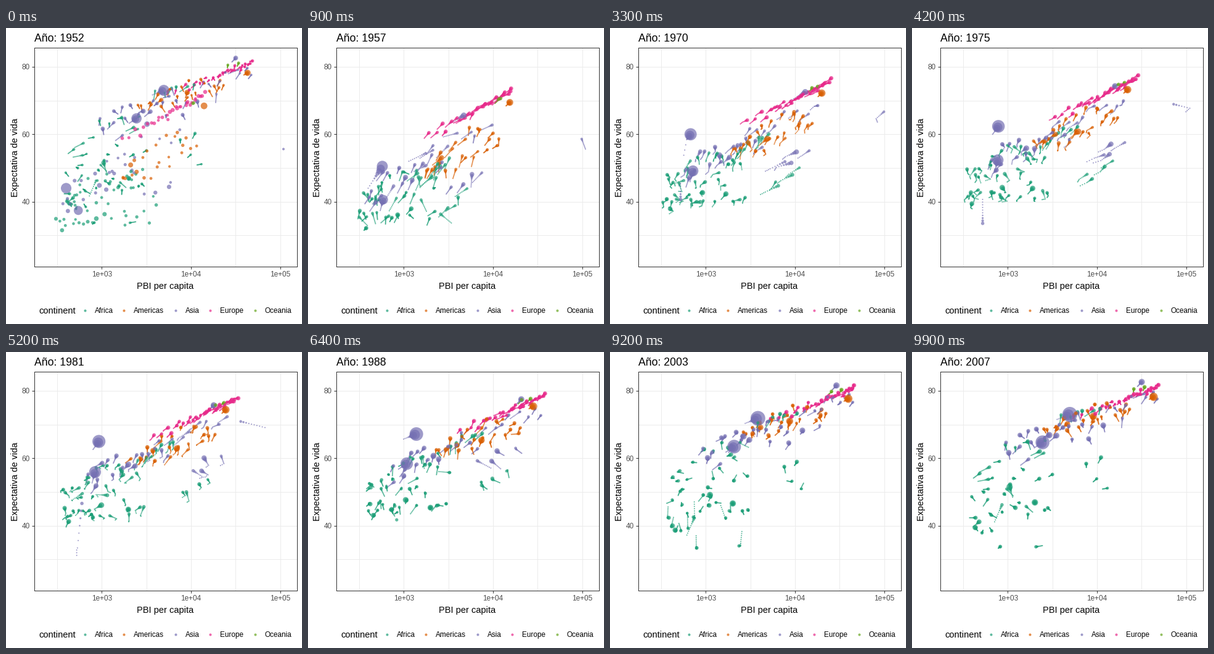
These frames come from a looping animation (480 by 480 pixels, 10000 ms). A matplotlib script:

```python
import numpy as np
import matplotlib.pyplot as plt
from matplotlib.animation import FuncAnimation
from matplotlib.colors import to_rgba

plt.rcParams["font.family"] = "Liberation Sans"

SIZE, DPI, FRAMES, WAKE = 480, 96, 100, 10
ALPHA = 0.7
LEFT, TOP, RIGHT, BOTTOM = 46.2, 32.2, 472.2, 387.2
COLORS = {"Africa": "#1B9E77", "Americas": "#D95F02", "Asia": "#7570B3",
          "Europe": "#E7298A", "Oceania": "#66A61E"}
YEARS = np.linspace(1952, 2007, FRAMES)
STEPS = np.arange(1952, 2008, 5)
T = (STEPS - 1952) / 55

rng = np.random.default_rng(12)
tracks = []  # (rgba, log10 income, life expectancy, point size)


def add(continent, pop, years, logx, life):
    """Store one country; pop holds first and last population in millions."""
    people = np.interp(YEARS, [1952, 2007], pop)
    tracks.append((to_rgba(COLORS[continent], ALPHA),
                   np.interp(YEARS, years, logx),
                   np.interp(YEARS, years, life),
                   1 + 7.2 * np.sqrt(people / 1318)))


def country(continent, pop, *points):
    """A country given by a few (year, income, life expectancy) points."""
    year, income, life = np.array(points, float).T
    add(continent, pop, year, np.log10(income), life)


def blend(first, last, rank, ease):
    """Place at a rank inside a range that moves from first to last."""
    a, b = (lo + (hi - lo) * rank for lo, hi in (first, last))
    return a + (b - a) * ease


def crowd(continent, n, x0, x1, y0, y1, link=0.6, skew=1.0, wobble=1.0,
          boom=0.0, fall=0.0, pop=6, growth=2.8):
    """Countries drifting from box (x0, y0) to (x1, y1), richer ones higher.

    boom lifts income around 1977, fall cuts life expectancy after 1988.
    """
    for q in (np.arange(n) + 0.5) / n:
        r = link * q + (1 - link) * rng.random()
        x = blend(x0, x1, q ** skew, T * (1.6 - 0.6 * T))
        y = blend(y0, y1, r ** skew, T * (1.3 - 0.3 * T))
        x += boom * rng.uniform(0.5, 1) * np.exp(-((STEPS - 1977) / 9) ** 2)
        y -= fall * rng.random() ** 2 * np.clip((STEPS - 1988) / 15, 0, 1)
        x += 0.025 * wobble * rng.normal(size=len(STEPS))
        y += 0.4 * wobble * rng.normal(size=len(STEPS))
        start = min(pop * np.exp(0.9 * rng.normal()), 60)
        add(continent, (start, start * growth), STEPS, x, y)


# China, India, Japan
country("Asia", (556, 1318), (1952, 400, 44), (1957, 576, 50.5),
        (1962, 488, 44.5), (1967, 613, 58.4), (1982, 962, 65.5),
        (2007, 4959, 73))
country("Asia", (372, 1110), (1952, 547, 37.4), (1982, 856, 56.6),
        (2007, 2452, 64.7))
country("Asia", (86, 127), (1952, 3217, 63), (1972, 14779, 73.4),
        (2007, 31656, 82.6))
# Kuwait, Cambodia
country("Asia", (0.2, 2.5), (1952, 108382, 55.6), (1967, 80895, 64.6),
        (1972, 109348, 67.7), (1982, 31354, 71.3), (2007, 47307, 77.6))
country("Asia", (5, 14), (1952, 368, 39.4), (1967, 523, 45.4),
        (1977, 525, 31.2), (1982, 624, 51), (2007, 1714, 59.7))
# Nigeria, Rwanda
country("Africa", (33, 135), (1952, 1077, 36.3), (1977, 1982, 44.5),
        (2007, 2014, 46.9))
country("Africa", (2.5, 8.9), (1952, 493, 40), (1987, 848, 44),
        (1992, 737, 23.6), (1997, 590, 36.1), (2007, 863, 46.2))
# United States, Brazil
country("Americas", (158, 301), (1952, 13990, 68.4), (1982, 25010, 74.6),
        (2007, 42952, 78.2))
country("Americas", (57, 190), (1952, 2109, 50.9), (1977, 6660, 61.5),
        (2007, 9066, 72.4))

# Africa: south of the Sahara, north coast, resource exporters
crowd("Africa", 40, (2.5, 3.4), (2.63, 3.5), (31, 49), (47, 68),
      link=0.25, skew=1.3, wobble=1.6, fall=18, pop=4)
crowd("Africa", 6, (3.15, 3.45), (3.58, 4.04), (42, 52), (71, 76.4))
crowd("Africa", 4, (3.35, 3.7), (3.85, 4.15), (33, 45), (58, 64),
      boom=0.3, fall=14, pop=2)
crowd("Americas", 23, (3.2, 4.05), (3.4, 4.4), (40, 67), (65, 80), pop=4)
# Asia: poorer half, fast growers, oil states
crowd("Asia", 17, (2.55, 3.4), (2.95, 3.95), (36, 56), (61, 75), pop=9)
crowd("Asia", 7, (3.0, 3.95), (4.1, 4.67), (50, 65), (74, 82), pop=3)
crowd("Asia", 4, (3.45, 3.85), (3.65, 4.35), (40, 47), (62, 74),
      boom=0.5, pop=6)
crowd("Europe", 30, (3.1, 4.15), (3.65, 4.7), (54, 73), (69.5, 82),
      link=0.85, skew=0.55, wobble=0.5, pop=9, growth=1.3)
crowd("Oceania", 2, (4.0, 4.03), (4.35, 4.6), (69, 69.5), (80, 81.5),
      wobble=0.3, growth=2)

tracks = [tracks[i] for i in rng.permutation(len(tracks))]
rgba, logx, life, size = (np.array(part) for part in zip(*tracks))

fig = plt.figure(figsize=(SIZE / DPI, SIZE / DPI), dpi=DPI, facecolor="white")
ax = fig.add_axes([LEFT / SIZE, 1 - BOTTOM / SIZE,
                   (RIGHT - LEFT) / SIZE, (BOTTOM - TOP) / SIZE])
ax.set(xlim=(2.2476, 5.1886), ylim=(20.705, 85.605))
ax.set_xticks([3, 4, 5], ["1e+03", "1e+04", "1e+05"])
ax.set_yticks([40, 60, 80])
ax.set_xticks([2.5, 3.5, 4.5], minor=True)
ax.set_yticks([30, 50, 70], minor=True)
ax.set_axisbelow(True)
ax.grid(which="both", color="#EBEBEB", lw=0.75)
ax.tick_params(length=2.75, width=0.75, pad=2.6, color="#333333",
               labelcolor="#4D4D4D", labelsize=8.8)
ax.tick_params(which="minor", length=0)
for spine in ax.spines.values():
    spine.set(color="#333333", lw=0.75)


def label(x, y, text, pt, **kw):
    return fig.text(x / SIZE, 1 - y / SIZE, text, fontsize=pt, **kw)


def area(s):
    """Marker area in square points for a point size in mm."""
    return (0.75 * np.maximum(2.845 * s + 0.945, 2)) ** 2


title = label(46, 22, "", 13.2)
label(258.5, 423, "PBI per capita", 11, ha="center")
label(14.7, 210, "Expectativa de vida", 11, rotation=90,
      ha="center", va="center")
label(53, 463, "continent", 11)

key = fig.add_axes([0, 0, 1, 1], facecolor="none")
key.set(xlim=(0, SIZE), ylim=(SIZE, 0))
key.axis("off")
for (name, color), x in zip(COLORS.items(), (128, 191, 274.5, 331, 403.5)):
    key.scatter(x, 457.5, s=area(1.1), color=color, alpha=ALPHA, lw=0)
    label(x + 16, 462, name, 8.8)

lags = np.arange(WAKE)[::-1]
falloff = (1 - lags / WAKE) ** 3
dots = ax.scatter(np.zeros(logx.shape[0] * WAKE),
                  np.zeros(logx.shape[0] * WAKE), lw=0, zorder=3)
dots.set_facecolor(np.tile(rgba, (WAKE, 1)))


def draw(frame):
    past = (frame - lags) % FRAMES
    dots.set_offsets(np.column_stack([logx[:, past].T.ravel(),
                                      life[:, past].T.ravel()]))
    dots.set_sizes(area((size[:, past] * falloff).T.ravel()))
    title.set_text(f"Año: {YEARS[frame]:.0f}")
    return dots, title


anim = FuncAnimation(fig, draw, frames=FRAMES, interval=100,
                     repeat=True, repeat_delay=0)
plt.show()
```
